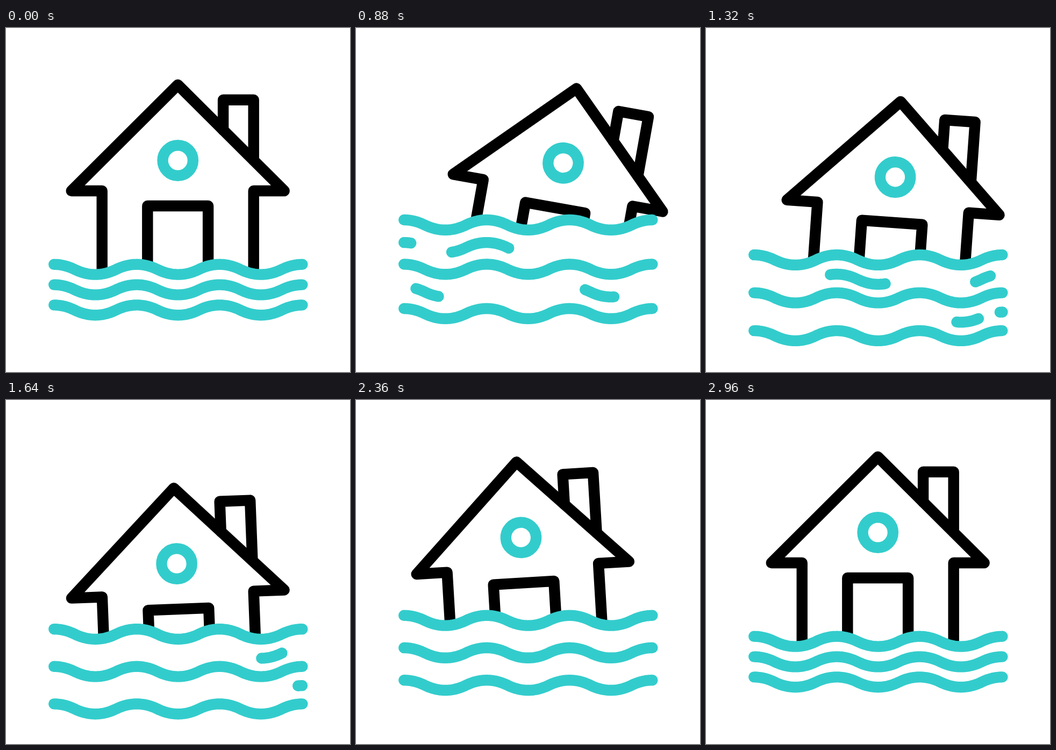
Animation, 640 px wide and 640 px high, one loop 3 s. Source, as an HTML page with a canvas:

```html
<!DOCTYPE html>
<html lang="en">
<head>
<meta charset="utf-8">
<title>House on the flood</title>
<style>
  html, body { margin: 0; width: 100%; height: 100%; overflow: hidden; background: #fff; }
  canvas { display: block; width: 640px; height: 640px; }
</style>
</head>
<body>
<canvas id="stage" width="640" height="640"></canvas>
<script>
const ctx = document.getElementById('stage').getContext('2d');
const LOOP = 3000, STEP = 40;
const LEFT = 89.2, RIGHT = 551.4, QUARTER = (RIGHT - LEFT) / 12, DIP = 9.4;
const TEAL = '#33cccc', LINE = 20.4;
const MIDDLE = 319.7, WINDOW_Y = 246.5;
const DASH_DELAY = 365;

const clamp = v => Math.min(1, Math.max(0, v));
const mix = (a, b, s) => a + (b - a) * s;
const smooth = u => u * u * (3 - 2 * u);
const ramp = (t, from, to) => smooth(clamp((t - from) / (to - from)));

// Cubic easing with handles (.4, 0) and (.2, 1)
function settle(u) {
  let lo = 0, hi = 1;
  for (let i = 0; i < 24; i++) {
    const m = (lo + hi) / 2, n = 1 - m;
    if (1.2 * n * n * m + 0.6 * n * m * m + m * m * m < u) lo = m;
    else hi = m;
  }
  return smooth(lo);
}

// Eases from one pose to the next and holds in between
function pose(t, rest, moves) {
  return moves.reduce((now, { from, to, at }) => {
    const s = ramp(t, from, to);
    return now.map((v, i) => mix(v, at[i], s));
  }, rest);
}

// window x, window y, tilt in degrees
const AFLOAT = [MIDDLE, WINDOW_Y, 0];
const houseMoves = [
  { from: 0, to: 680, at: [385.5, 251.2, 10.1] },
  { from: 1080, to: 1565, at: [317.6, 304.6, -2.2] },
  { from: 1800, to: 2480, at: [306, 251.5, -3.5] },
  { from: 2480, to: 2960, at: AFLOAT }
];

// height of the middle wave, gap between waves
const CALM = [477.6, 37.8];
const waterMoves = [
  { from: 320, to: 680, at: [439.5, 82.5] },
  { from: 880, to: 1400, at: [496.2, 69.7] },
  { from: 1600, to: 2240, at: [459.7, 62] },
  { from: 2240, to: 2960, at: CALM }
];

// start and duration for both ends of a dash, one entry per lane
const lanes = [
  { head: [410, 1050], tail: [640, 855], ease: smooth },
  { head: [310, 1010], tail: [372, 1090], ease: settle }
];

// Wave made of parabolic arcs, measured down from the crest
function dip(x) {
  let p = ((x - LEFT) / QUARTER) % 4;
  if (p > 2) p = 4 - p;
  return p < 1 ? DIP * p * p : DIP * (2 - (2 - p) * (2 - p));
}

function trace(y, from, to) {
  ctx.beginPath();
  ctx.moveTo(from, y + dip(from));
  for (let x = from + 2; x < to; x += 2) ctx.lineTo(x, y + dip(x));
  ctx.lineTo(to, y + dip(to));
}

function wave(y, from = LEFT, to = RIGHT) {
  trace(y, from, to);
  ctx.strokeStyle = TEAL;
  ctx.stroke();
}

function poly(...pts) {
  ctx.beginPath();
  pts.forEach(([x, y]) => ctx.lineTo(x, y));
  ctx.stroke();
}

function house(t) {
  const [x, y, tilt] = pose(t, AFLOAT, houseMoves);
  ctx.save();
  ctx.translate(x, y);
  ctx.rotate(tilt * Math.PI / 180);
  ctx.translate(0, -WINDOW_Y);
  ctx.strokeStyle = '#000';
  poly([-141, 452], [-141, 303], [-198, 303], [0, 105.7], [198, 303], [141, 303], [141, 452]);
  poly([84.4, 190], [84.4, 133.8], [141, 133.8], [141, 246]);
  poly([-56.4, 440], [-56.4, 331], [56.4, 331], [56.4, 440]);
  ctx.strokeStyle = TEAL;
  ctx.beginPath();
  ctx.arc(0, WINDOW_Y, 28.2, 0, Math.PI * 2);
  ctx.stroke();
  ctx.restore();
}

function drawDashes(t, top, gap) {
  lanes.forEach(({ head, tail, ease }, lane) => {
    // each lane slides out from under the wave above it
    const drop = 0.51 * ramp(t, 400 - 100 * lane, 600 - 100 * lane);
    const y = top + gap * (lane + drop);
    for (const late of [0, DASH_DELAY]) {
      const along = ([start, span]) => clamp((t - late - start) / span);
      const a = along(tail), b = along(head);
      if (b > 0 && a < 1) wave(y, mix(LEFT, RIGHT, ease(a)), mix(LEFT, RIGHT, ease(b)) + 0.1);
    }
  });
}

function draw(t) {
  const [mid, gap] = pose(t, CALM, waterMoves);
  const top = mid - gap;
  ctx.fillStyle = '#fff';
  ctx.fillRect(0, 0, 640, 640);
  ctx.lineWidth = LINE;
  ctx.lineCap = ctx.lineJoin = 'round';
  house(t);

  // water hides the submerged part of the house
  trace(top, LEFT, RIGHT);
  ctx.lineTo(RIGHT, 640);
  ctx.lineTo(LEFT, 640);
  ctx.fill();

  drawDashes(t, top, gap);
  for (let i = 0; i < 3; i++) wave(top + i * gap);
}

const begin = performance.now();
function frame() {
  const t = (performance.now() - begin) % LOOP;
  draw(Math.floor(t / STEP) * STEP);
  requestAnimationFrame(frame);
}
frame();
</script>
</body>
</html>
```
